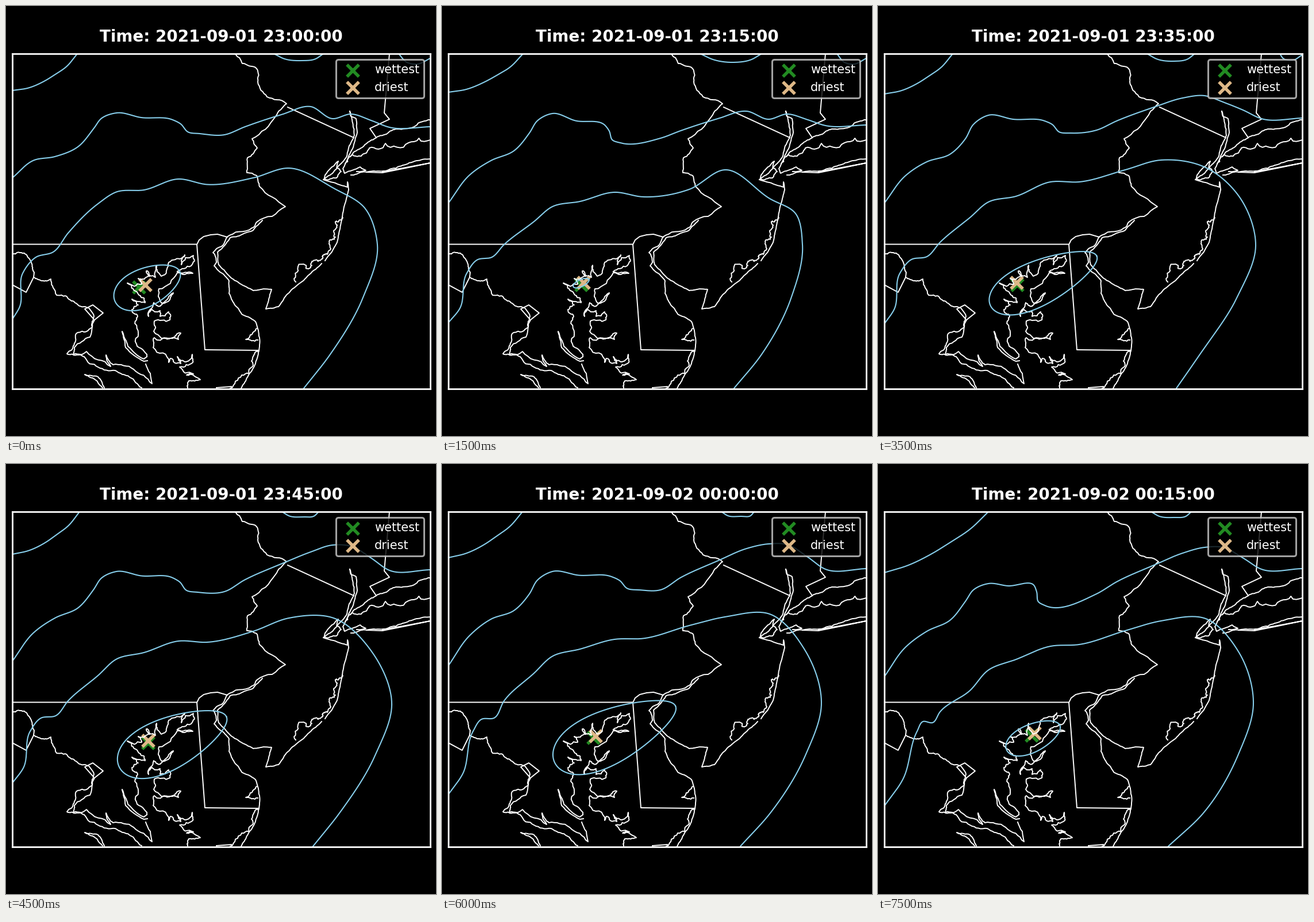
These frames come from a looping animation (748x748 px, 8 s). A matplotlib script:

```python
import numpy as np
import matplotlib.pyplot as plt
from matplotlib.animation import FuncAnimation

SIZE, FRAMES, STEP = 748, 16, 500
LEFT, RIGHT, TOP, BOTTOM = 10.5, 737.5, 82.5, 665.5
KEYS = (0, 3, 5, 7, 9, 12, 15)  # steps at which the motion rows are given
rng = np.random.default_rng(4)

plt.rcParams["font.family"] = "DejaVu Sans"
fig = plt.figure(figsize=(SIZE / 100, SIZE / 100), dpi=100, facecolor="black")
ax = fig.add_axes([LEFT / SIZE, 1 - BOTTOM / SIZE,
                   (RIGHT - LEFT) / SIZE, (BOTTOM - TOP) / SIZE], facecolor="black")
ax.set(xlim=(LEFT, RIGHT), ylim=(BOTTOM, TOP), xticks=[], yticks=[])
for spine in ax.spines.values():
    spine.set(color="white", linewidth=2)
title = ax.set_title("", color="white", size=20, weight="bold", pad=15)


def pairs(xy):
    return np.reshape(xy, (-1, 2)).astype(float)


def coast(rough, *xy):
    """Line through the points, broken up by midpoint displacement."""
    p = pairs(xy)
    while rough and np.hypot(*np.diff(p, axis=0).T).mean() > 4:
        d = np.diff(p, axis=0)
        shift = rng.uniform(-rough, rough, (len(d), 1))
        mid = (p[:-1] + p[1:]) / 2 + shift * d[:, ::-1] * (1, -1)
        p = np.insert(p, np.arange(1, len(p)), mid, axis=0)
    ax.plot(*p.T, color="white", lw=1.4, zorder=1.5)


def smooth(p, n=400):
    """Cubic Hermite curve through the points."""
    s = np.r_[0, np.cumsum(np.hypot(*np.diff(p, axis=0).T))]
    m = np.gradient(p, s, axis=0)
    t = np.linspace(0, s[-1], n)
    k = np.clip(np.searchsorted(s, t, side="right") - 1, 0, len(p) - 2)
    h = (s[k + 1] - s[k])[:, None]
    u = (t - s[k])[:, None] / h
    return ((1 + 2 * u) * (1 - u) ** 2 * p[k] + u * (1 - u) ** 2 * h * m[k]
            + u * u * (3 - 2 * u) * p[k + 1] + u * u * (u - 1) * h * m[k + 1])


def at(i, row):
    """Value of a motion row at step i; a plain number stays constant."""
    return np.interp(i, KEYS, np.broadcast_to(row, len(KEYS)))


class Contour:
    """Smooth curve pulled about by a few of its points; the rest follow."""

    def __init__(self, *xy, dx, dy):
        self.base, self.pulls = pairs(xy), (dx, dy)
        self.line, = ax.plot([], [], color="skyblue", lw=1.5, zorder=2)

    def show(self, i):
        p = self.base.copy()
        for axis, pull in enumerate(self.pulls):
            offsets = [at(i, row) for row in pull.values()]
            p[:, axis] += np.interp(np.arange(len(p)), list(pull), offsets)
        self.line.set_data(smooth(p).T)


class Ring:
    """Tilted egg that grows and shrinks."""
    tilt = np.radians(25)
    angle = np.linspace(0, 2 * np.pi, 200)

    def __init__(self, *rows):
        self.rows = rows
        self.line, = ax.plot([], [], color="skyblue", lw=1.5, zorder=2)

    def show(self, i):
        cx, cy, a, b = (at(i, row) for row in self.rows)
        c, s = np.cos(self.tilt), np.sin(self.tilt)
        u = a * np.cos(self.angle)
        v = b * np.sin(self.angle) * (1 - a / 400 * np.cos(self.angle))
        self.line.set_data(cx + u * c + v * s, cy - u * s + v * c)


class Cross:
    def __init__(self, color, label, x, y):
        self.rows = x, y
        self.dots = ax.scatter([0], [0], s=225, marker="x", lw=4, color=color,
                               label=label, zorder=1)

    def show(self, i):
        self.dots.set_offsets([[at(i, row) for row in self.rows]])


# State lines
coast(0, 11, 414.5, 332, 414.5, 346, 598, 440, 599)
coast(0, 332, 415, 336, 407, 344, 401, 356, 398, 368, 397, 385, 402)
coast(0, 490, 176, 605, 229)
coast(0, 667, 83, 658, 186, 667, 197, 633, 213, 644, 229)
coast(0, 11, 485, 35, 498, 48, 472)
coast(0, 152, 544, 137, 527, 151, 520, 169, 534, 154, 546)
coast(0, 366, 664, 392, 662)

# Delaware River and bay
coast(.12, 398, 83, 411, 100, 436, 109, 438, 132, 454, 158, 488, 170, 469, 192, 428, 231,
      437, 247, 420, 264, 419, 290, 436, 295, 441, 314, 486, 349, 436, 376, 428, 386,
      384, 402, 360, 429, 366, 446)
coast(.06, 366, 446, 362, 452, 388, 478, 388, 500, 410, 536, 434, 549, 440, 599,
      430, 630, 409, 665)
coast(.25, 440, 599, 431, 608, 428, 628, 410, 642, 390, 665)
coast(.25, 436, 561, 425, 572, 417, 580, 438, 581)

# New Jersey shore and lagoons
coast(.06, 446, 373, 430, 390, 390, 403, 368, 428, 370, 450, 409, 484, 430, 495, 462, 493,
      452, 527, 474, 523, 506, 486, 549, 448)
coast(.04, 555, 443, 576, 411, 585, 367, 596, 320, 594, 306, 594, 315, 552, 302)
coast(.4, 585, 367, 575, 374, 573, 402, 560, 430, 549, 440, 530, 455, 504, 480)

# Harbour and Long Island
coast(.08, 598, 183, 606, 225, 592, 263, 574, 284, 553, 302)
coast(.06, 598, 183, 600, 192, 609, 196, 611, 220, 603, 248, 586, 283, 589, 291,
      616, 280, 626, 286, 610, 288)
coast(.12, 553, 302, 565, 282, 578, 270, 575, 281, 583, 288, 575, 299, 553, 302)
coast(.12, 599, 262, 622, 244, 644, 229, 684, 214, 738, 198)
coast(.22, 590, 274, 602, 258, 618, 261, 632, 247, 660, 239, 700, 238, 738, 233)
coast(.08, 600, 294, 640, 287, 690, 277, 738, 266)
coast(0, 627, 289, 655, 290, 700, 281, 738, 273, 690, 282, 655, 288)

# Potomac
coast(.15, 11, 431, 32, 430, 46, 457, 48, 472, 78, 475, 88, 503, 118, 514, 153, 540,
      150, 558, 122, 570, 106, 605, 136, 610, 190, 634, 236, 664)
coast(.12, 154, 546, 146, 576, 119, 594, 117, 607, 140, 601, 182, 627, 174, 607,
      186, 624, 222, 632, 254, 657, 243, 623)
coast(.1, 171, 664, 160, 645, 137, 641, 158, 652, 168, 664)

# Chesapeake Bay
coast(.06, 246, 617, 240, 618, 208, 594, 202, 566, 212, 592, 240, 614, 245, 610)
coast(.22, 245, 610, 227, 588, 224, 552, 229, 540, 219, 528, 230, 520, 219, 510, 242, 516,
      234, 504, 222, 494, 211, 482, 236, 484, 230, 474, 250, 470, 244, 461, 260, 472,
      262, 451, 270, 470, 282, 449, 303, 440, 311, 433, 305, 450, 326, 434, 322, 452,
      298, 462)
coast(.15, 298, 462, 325, 465, 298, 464, 266, 492, 271, 517, 291, 499, 284, 512, 268, 522)
coast(.22, 268, 522, 257, 516, 248, 540, 254, 528, 268, 530, 268, 540, 283, 532, 285, 546,
      258, 548, 257, 566, 290, 578, 304, 569, 300, 580, 258, 577, 256, 594, 283, 620,
      286, 613, 304, 622, 298, 610, 313, 619, 324, 606, 325, 620, 302, 628, 326, 640,
      314, 642, 338, 650, 318, 652, 316, 664)

corner = Contour(
    11, 150, 40, 145, 70, 132, 88, 121, 110, 106, 130, 83,
    dx={0: 0, 5: (-6, 11, 16, 0, -2, 10, 62)},
    dy={0: (-3, 0, 7, 3, 7, 13, 39), 5: 0})

dip = Contour(
    470, 83, 487, 92, 515, 95, 538, 92, 550, 83,
    dx={0: (-4, -21, -6, -2, 10, 16, 5), 4: (2, 6, 5, 1, -6, -7, -5)},
    dy={0: 0, 2: (0, 3, 2, 1, -3, -4, -2), 4: 0})

edge = Contour(
    690, 83, 702, 98, 718, 101, 738, 91,
    dx={0: (-7, -3, 0, 6, 8, 8, 8), 3: 0},
    dy={0: (0, 0, 0, -6, -22, -22, -22)})

upper = Contour(
    11, 343, 48, 295, 85, 271, 125, 258, 152, 231, 166, 206, 192, 190, 235, 197, 290, 200,
    303, 206, 315, 219, 335, 221, 380, 216, 415, 200, 480, 176, 530, 160, 568, 156,
    600, 167, 635, 181, 667, 196, 738, 195,
    dx={6: 0, 8: (0, -6, 0, 0, 0, 5, -18), 11: (2, -25, -5, 0, -2, 8, -45), 12: 0},
    dy={0: (-44, 0, -8, 0, 0, 8, 27), 2: (-9, -2, 0, 0, -3, -1, 20),
        4: (-17, -10, 3, 0, -12, -5, 8), 6: (-4, -3, 2, 0, -3, -3, 18),
        8: (-2, 8, 0, 0, -2, -4, 12), 11: (1, 17, 2, 0, 2, -2, 25),
        12: (8, 14, 1, 0, 6, 3, 10), 15: (15, 23, 5, 0, -7, -13, -5),
        16: (40, 41, 22, 0, -15, -17, -11), 17: (21, 21, 10, 0, -24, -27, -22),
        19: (15, 12, 5, 0, -11, -13, -13)})

lower = Contour(
    11, 553, 28, 528, 38, 465, 58, 441, 85, 436, 108, 411, 160, 368, 192, 341, 240, 331,
    300, 306, 350, 306, 430, 285, 492, 268, 570, 281, 630, 334, 657, 415, 625, 506,
    560, 606, 519, 665,
    dx={0: 0, 2: (-9, 5, 0, 0, 4, 16, 30), 5: 0, 13: 0, 15: (-11, -30, -13, 0, 14, 3, -4),
        17: (4, -4, -6, 0, 21, 12, 7), 18: (-1, -11, -3, 0, 15, 0, -14)},
    dy={0: (-8, -2, 0, 0, 2, 22, 42), 2: 0, 4: (-8, 1, 0, 0, 2, 6, 14),
        6: (-24, 7, 4, 0, 0, -4, 26), 8: (-11, 9, 7, 0, -3, -9, 9),
        9: (-5, 18, 5, 0, 2, -1, 11), 11: (14, 34, 3, 0, 6, -4, 5),
        12: (14, 17, 2, 0, 0, -2, 5), 13: (36, 54, 24, 0, -13, -20, -12), 15: 0})

ring = Ring((246, 242, 243, 288, 290, 301, 270), (488, 482, 483, 478, 483, 470, 476),
            (62, 15, 33, 102, 103, 116, 51), (33, 6, 17, 38, 44, 46, 24))

wettest = Cross("forestgreen", "wettest",
                (231, 242, 242, 242, 247, 263, 267), (489, 485, 484, 485, 485, 476, 472))
driest = Cross("burlywood", "driest",
               (242, 246, 241, 241, 247, 267, 272), (485, 481, 481, 481, 481, 473, 468))

legend = ax.legend(loc="upper right", fontsize=15, facecolor="black",
                   edgecolor="0.8", framealpha=0.8, labelcolor="white")
legend.get_frame().set_linewidth(2.2)

parts = [corner, dip, edge, upper, lower, ring, wettest, driest]


def update(i):
    day, clock = divmod(23 * 60 + 5 * i, 1440)
    title.set_text(f"Time: 2021-09-{day + 1:02d} {clock // 60:02d}:{clock % 60:02d}:00")
    for part in parts:
        part.show(i)
    return [title]


anim = FuncAnimation(fig, update, frames=FRAMES, interval=STEP, repeat=True, blit=False)
plt.show()
```
